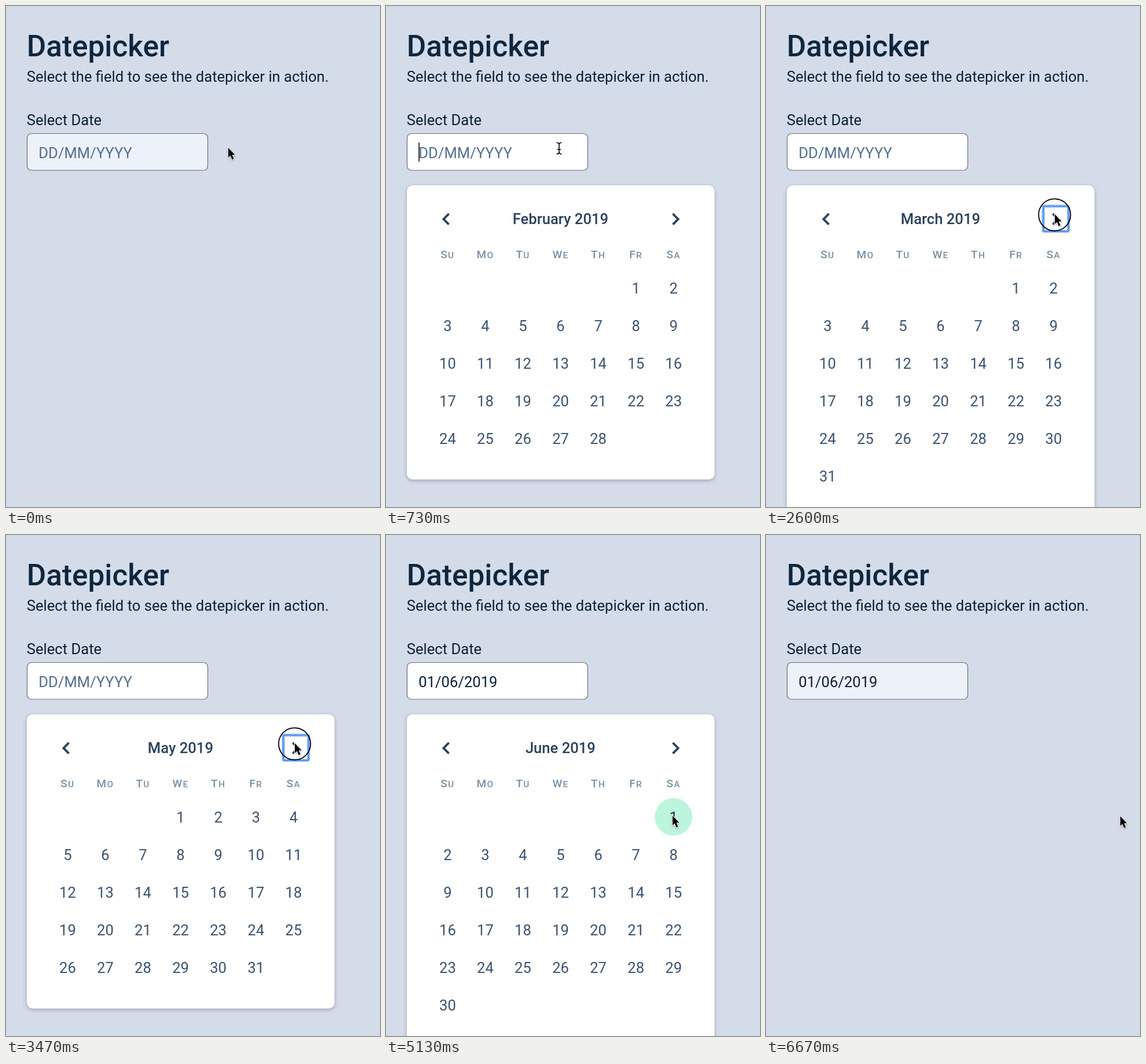
Recreate the animation shown at these times as an HTML page. Size 646 px wide and 866 px high, loop 7070 ms.

```html
<!DOCTYPE html>
<html lang="en">
<head>
<meta charset="utf-8">
<title>Datepicker</title>
<style>
  html, body { margin: 0; width: 100%; height: 100%; overflow: hidden; background: #d4dce9; }
  svg { display: block; width: 646px; height: 866px; font: 25.6px Roboto, sans-serif; fill: #0b2038; }
  .title { font-size: 51.2px; font-weight: 500; fill: #0e263e; }
  .mid { text-anchor: middle; }
  .month { font-weight: 500; fill: #2a425c; }
  .week { font-size: 19px; font-weight: 500; letter-spacing: 1.3px; fill: #7690a8; }
  .small { font-size: 15.4px; }
  .day { fill: #3a5371; }
  .day.on { fill: #17364a; }
  .line { fill: none; stroke: #2a425c; stroke-width: 3.8; }
  #card { filter: drop-shadow(0 2px 3px rgba(30, 45, 70, .33)); }
  #arrow { filter: drop-shadow(0 1px 1px rgba(0, 0, 0, .35)); }
</style>
</head>
<body>
<svg viewBox="0 0 646 866">
  <text class="title" x="35.8" y="87">Datepicker</text>
  <text x="35.8" y="131">Select the field to see the datepicker in action.</text>
  <text x="35.8" y="206">Select Date</text>
  <rect id="field" x="36.5" y="220.5" width="312" height="63.5" rx="7.5" stroke="#6b6f76" stroke-width="1.2"/>
  <text id="value" x="56.3" y="262.5"></text>
  <rect id="caret" x="56.3" y="236" width="1.5" height="33" fill="#000"/>

  <g id="picker">
    <rect id="card" x="36" y="310" width="531.5" rx="10" fill="#fff"/>
    <path class="line" d="M108.6 359.2l-9.2 9.2 9.2 9.2M495.4 359.2l9.2 9.2-9.2 9.2"/>
    <g id="focus" fill="none">
      <rect x="479" y="346" width="43.5" height="43.5" rx="2" stroke="#b3d0fb" stroke-width="5.4"/>
      <rect x="479" y="346" width="43.5" height="43.5" rx="1.5" stroke="#5a97f4" stroke-width="3.2"/>
    </g>
    <text id="month" class="mid month" x="301.4" y="377"></text>
    <circle id="spot" cx="496.7" cy="487.3" r="32.4"/>
    <g id="grid"></g>
  </g>

  <circle id="ring" r="27.6" fill="none" stroke="#000" stroke-width="1.8"/>
  <g id="arrow">
    <path d="M.9 2V19L4.6 15.4 7.6 22.4 10.6 21.1 7.6 14.2H12.6Z"
      fill="#000" stroke="#fff" stroke-width="2" paint-order="stroke"/>
  </g>
  <g id="beam" fill="none" stroke-linecap="round">
    <path id="beamShape" d="M-4-9.8Q-.6-9.8 0-7.2Q.6-9.8 4-9.8M-4 9.8Q-.6 9.8 0 7.2Q.6 9.8 4 9.8M0-7.2V7.2M-2.6 2H2.6"/>
  </g>
</svg>
<script>
const LOOP = 7070, STEP = 200 / 3;
const MONTHS = ['January', 'February', 'March', 'April', 'May', 'June'];
const NS = 'http://www.w3.org/2000/svg';
const $ = id => document.getElementById(id);
const between = (k, a, b) => k >= a && k < b;
const show = (id, on) => $(id).setAttribute('visibility', on ? 'inherit' : 'hidden');

function add(parent, tag, attrs, text = '') {
  const el = document.createElementNS(NS, tag);
  for (const name in attrs) el.setAttribute(name, attrs[name]);
  el.textContent = text;
  parent.append(el);
  return el;
}

// White halo below the dark I-beam
const shape = $('beamShape');
const halo = shape.cloneNode();
halo.removeAttribute('id');
$('beam').prepend(halo);
halo.setAttribute('stroke', '#fff');
halo.setAttribute('stroke-width', 3.4);
shape.setAttribute('stroke', '#000');
shape.setAttribute('stroke-width', 1.6);

const colX = c => 106.4 + 65.05 * c;
['SU', 'MO', 'TU', 'WE', 'TH', 'FR', 'SA'].forEach((name, c) => {
  const label = add($('grid'), 'text', { class: 'mid week', x: colX(c), y: 436.3 }, name[0]);
  add(label, 'tspan', { class: 'small' }, name[1]);
});
const days = Array.from({ length: 42 }, (_, i) =>
  add($('grid'), 'text', { class: 'mid day', x: colX(i % 7), y: 497 + 64.9 * Math.floor(i / 7) }));

// Pointer path: step, x, y
const PATH = [
  [0, 383, 243], [1, 377, 243], [2, 355, 244], [3, 316, 246], [4, 299, 246],
  [18, 299, 246], [20, 311, 271], [23, 355, 320], [26, 420, 333], [29, 489, 351], [30, 498, 358],
  [62, 498, 358], [64, 496, 386], [66, 493, 423], [69, 493, 466], [72, 494, 483],
  [82, 494, 483], [84, 508, 483], [86, 553, 484], [88, 598, 484], [90, 611, 484], [107, 611, 484]
];
// Ring visible: from step, to step
const PRESSES = [[9, 10], [31, 33], [38, 40], [45, 47], [52, 54], [74, 76], [93, 94]];
// Steps at which the next month comes up
const TURNS = [34, 40, 47, 55];
const PICK = 77, OPEN = 11, CLOSE = 95;

function pointer(k) {
  const i = PATH.findIndex(p => p[0] > k);
  const [k0, x0, y0] = PATH[i - 1], [k1, x1, y1] = PATH[i];
  const f = (k - k0) / (k1 - k0);
  return [x0 + (x1 - x0) * f, y0 + (y1 - y0) * f];
}

let shown = -1;
function setMonth(m) {
  if (m === shown) return;
  shown = m;
  const first = new Date(2019, m, 1).getDay();
  const count = new Date(2019, m + 1, 0).getDate();
  days.forEach((el, i) => {
    const d = i - first + 1;
    el.textContent = d > 0 && d <= count ? d : '';
  });
  $('month').textContent = MONTHS[m] + ' 2019';
  $('card').setAttribute('height', 183.5 + 65 * Math.ceil((first + count) / 7));
}

function draw(k) {
  const [x, y] = pointer(k);
  const picked = k >= PICK;
  const inField = x < 349 && x > 36 && y > 220 && y < 284;
  const open = between(k, OPEN, CLOSE);
  const onWeek = open && x > 484 && x < 510 && y > 416 && y < 442;
  const beam = inField || onWeek;

  $('field').setAttribute('fill', between(k, 9, CLOSE) ? '#fff' : '#edf1f9');
  $('value').textContent = picked ? '01/06/2019' : 'DD/MM/YYYY';
  $('value').setAttribute('fill', picked ? '#0b2038' : '#536f8f');
  show('caret', between(k, 9, 17) || between(k, 25, 31));

  show('picker', open);
  setMonth(1 + TURNS.filter(t => k >= t).length);
  show('focus', between(k, 31, 75));
  show('spot', k >= 69);
  $('spot').setAttribute('fill', picked ? '#bdf4dc' : '#edf1f9');
  days[6].classList.toggle('on', picked);

  show('ring', PRESSES.some(([a, b]) => between(k, a, b)));
  $('ring').setAttribute('cx', x + .5);
  $('ring').setAttribute('cy', y + (beam ? 0 : 3));
  show('arrow', !beam);
  show('beam', beam);
  $(beam ? 'beam' : 'arrow').setAttribute('transform', `translate(${x} ${y})`);
}

let last = -1;
function tick() {
  const t = performance.now() % LOOP;
  const k = Math.floor((t + 3.4) / STEP);
  if (k !== last) draw(last = k);
  requestAnimationFrame(tick);
}
tick();
</script>
</body>
</html>
```
